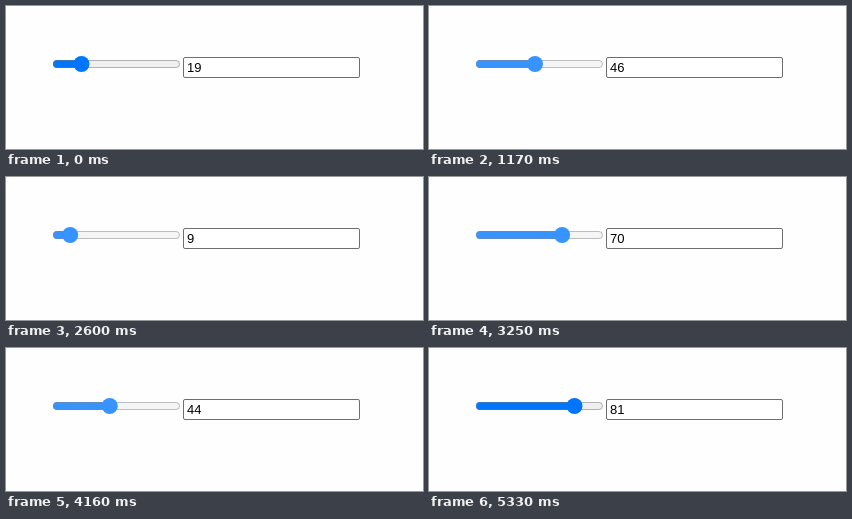
These frames come from a looping animation (417x143 px, 5.98 s). An HTML page:

```html
<!DOCTYPE html>
<html lang="en">
<head>
<meta charset="utf-8">
<title>Range slider</title>
<style>
  html, body { margin: 0; width: 100%; height: 100%; overflow: hidden; background: #fefefe; }
  svg { display: block; }
  text { font: 13px "Liberation Sans", Arial, sans-serif; }
</style>
</head>
<body>
<svg width="417" height="143">
  <rect id="track" x="47" y="54" width="127" height="8" rx="4"/>
  <rect id="fill" x="47" y="54" height="8" rx="4"/>
  <rect id="border" x="47.5" y="54.5" width="126" height="7" rx="3.5" fill="none" stroke-opacity=".5"/>
  <circle id="thumb" cy="58" r="8"/>
  <rect x="177.5" y="51.5" width="176" height="20" rx="1.5" fill="#fff" stroke="#6e6e6e"/>
  <text id="label" x="181" y="66"></text>
</svg>
<script>
const LOOP = 5980, STEP = 130;
const $ = id => document.getElementById(id);

const looks = {
  idle: { accent: '#0075ff', back: '#efefef', edge: '#767676' },
  hover: { accent: '#005cc8', back: '#e5e5e5', edge: '#4f4f4f' },
  active: { accent: '#3793ff', back: '#f5f5f5', edge: '#858585' }
};

// Turning points of the drag: [time, value]
const turns = [
  [0, 19], [780, 19], [1700, 91], [2600, 9], [2730, 9],
  [3550, 96], [3770, 96], [4485, 5], [5070, 81], [LOOP, 81]
];

function valueAt(t) {
  const i = turns.findIndex(p => p[0] > t);
  const [t0, a] = turns[i - 1], [t1, b] = turns[i];
  const ease = (1 - Math.cos(Math.PI * (t - t0) / (t1 - t0))) / 2;
  return Math.round(a + (b - a) * ease);
}

function lookAt(t) {
  if (t < 260 || t >= 5330) return looks.idle;
  return t < 390 ? looks.hover : looks.active;
}

function draw(now) {
  const t = Math.floor(now % LOOP / STEP) * STEP;
  const value = valueAt(t), x = 54 + value * 1.13;
  const { accent, back, edge } = lookAt(t);
  $('track').setAttribute('fill', back);
  $('border').setAttribute('stroke', edge);
  $('fill').setAttribute('fill', accent);
  $('fill').setAttribute('width', x - 47);
  $('thumb').setAttribute('fill', accent);
  $('thumb').setAttribute('cx', x);
  $('label').textContent = value;
}

const start = performance.now();
function tick() {
  draw(performance.now() - start);
  requestAnimationFrame(tick);
}
tick();
</script>
</body>
</html>
```
